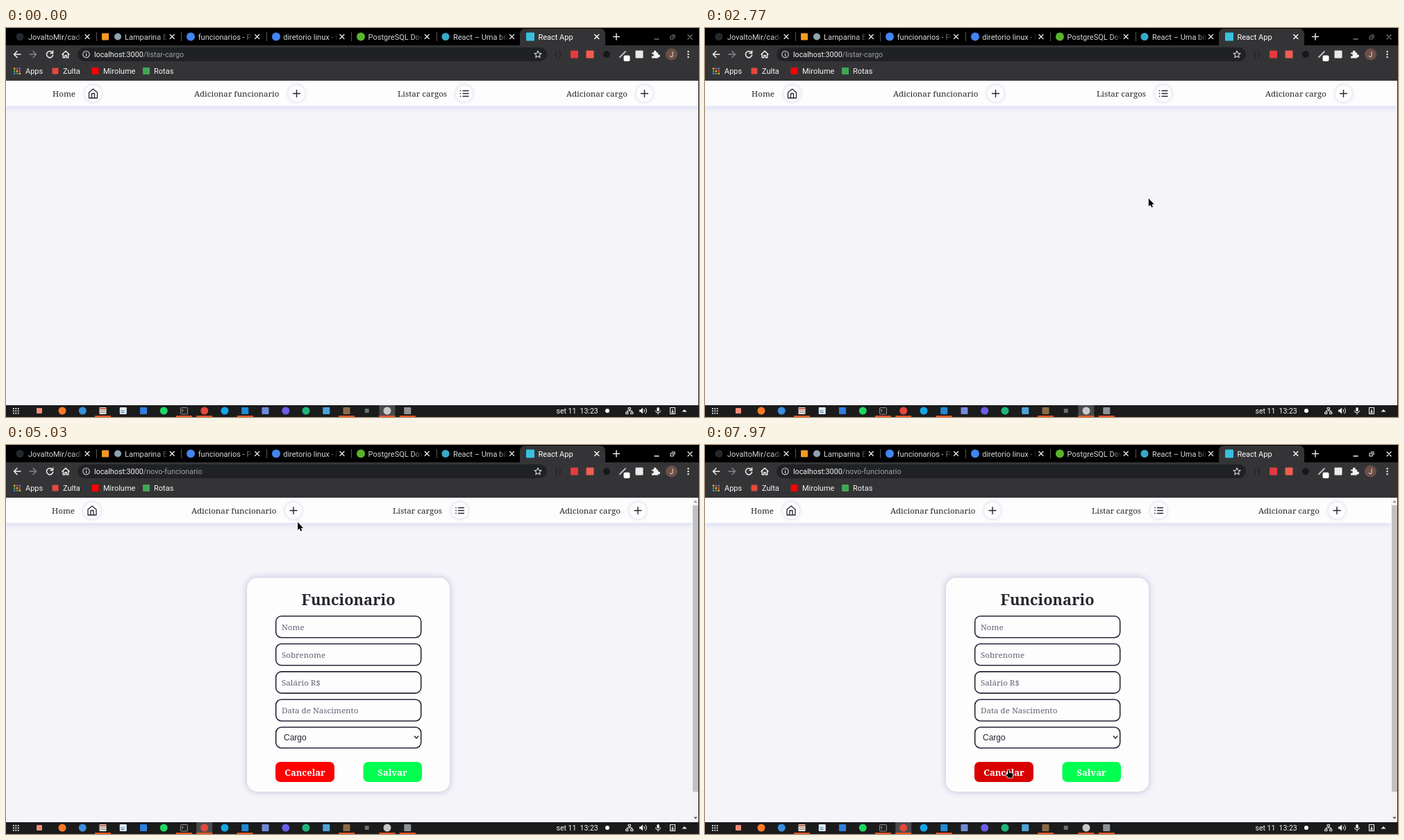
An HTML page with a canvas that plays this animation: 998 by 561 pixels, repeating every 8000 ms.

```html
<!DOCTYPE html>
<html lang="pt">
<head>
<meta charset="utf-8">
<title>React App</title>
<style>
html, body { margin: 0; width: 100%; height: 100%; overflow: hidden; background: #f4f4f9; }
canvas { display: block; }
</style>
</head>
<body>
<canvas id="stage" width="998" height="561"></canvas>
<script>
const ctx = document.getElementById('stage').getContext('2d');
const LOOP = 8000, PAGE_SWITCH = 4250, MENU_OPEN = 5600, MENU_CLOSE = 6550;
const UI = 'Roboto, sans-serif', SLAB = '"Noto Serif", serif', SANS = '"Liberation Sans", Arial, sans-serif';
const INK = '#29262f', BAR = '#343436', PAGE = '#f4f4f9', ORANGE = '#e95420';

// Cursor keys: time, x, y
const PATH = [
  [850, 920, 575], [1070, 836, 482], [1500, 790, 425], [2200, 696, 305],
  [2770, 639, 246], [3350, 520, 160], [3850, 416, 92], [4950, 416, 92],
  [5500, 486, 419], [6600, 486, 419], [7100, 568, 420], [7320, 568, 420],
  [7750, 437, 468], [8000, 437, 468]
];

function slope(i, k) {
  const a = PATH[i - 1], b = PATH[i], c = PATH[i + 1];
  if (!a || !c || a[k] === b[k] || b[k] === c[k]) return 0;
  return (c[k] - a[k]) / (c[0] - a[0]);
}

function cursorAt(t) {
  if (t < PATH[0][0]) return null;
  let i = 0;
  while (i < PATH.length - 2 && t >= PATH[i + 1][0]) i++;
  const p = PATH[i], q = PATH[i + 1], d = q[0] - p[0], u = (t - p[0]) / d;
  const hermite = k => {
    const u2 = u * u, u3 = u2 * u;
    return (2 * u3 - 3 * u2 + 1) * p[k] + (u3 - 2 * u2 + u) * d * slope(i, k)
      + (3 * u2 - 2 * u3) * q[k] + (u3 - u2) * d * slope(i + 1, k);
  };
  return { x: hermite(1), y: hermite(2) };
}

function rect(x, y, w, h, color) {
  ctx.fillStyle = color;
  ctx.fillRect(x, y, w, h);
}

function round(x, y, w, h, r, fill, stroke, width = 1) {
  ctx.beginPath();
  ctx.roundRect(x, y, w, h, r);
  if (fill) { ctx.fillStyle = fill; ctx.fill(); }
  if (stroke) { ctx.strokeStyle = stroke; ctx.lineWidth = width; ctx.stroke(); }
}

function circle(x, y, r, fill, stroke, width = 1) {
  ctx.beginPath();
  ctx.arc(x, y, r, 0, Math.PI * 2);
  if (fill) { ctx.fillStyle = fill; ctx.fill(); }
  if (stroke) { ctx.strokeStyle = stroke; ctx.lineWidth = width; ctx.stroke(); }
}

function square(x, y, s, color) {
  round(x - s / 2, y - s / 2, s, s, 1, color);
}

// Strokes an SVG path drawn around a centre point
function icon(x, y, d, color, width = 1.3, fill) {
  ctx.save();
  ctx.translate(x, y);
  const p = new Path2D(d);
  if (fill) { ctx.fillStyle = fill; ctx.fill(p); }
  if (color) {
    ctx.strokeStyle = color;
    ctx.lineWidth = width;
    ctx.lineJoin = ctx.lineCap = 'round';
    ctx.stroke(p);
  }
  ctx.restore();
}

function text(s, x, y, font, color, align = 'left') {
  ctx.font = font;
  ctx.fillStyle = color;
  ctx.textAlign = align;
  ctx.fillText(s, x, y);
}

function shadowed(color, blur, dy, draw) {
  ctx.save();
  ctx.shadowColor = color;
  ctx.shadowBlur = blur;
  ctx.shadowOffsetY = dy;
  draw();
  ctx.restore();
}

function tabTitle(s, x, end, rgb) {
  ctx.save();
  ctx.beginPath();
  ctx.rect(x, 0, end - x, 25);
  ctx.clip();
  const fade = ctx.createLinearGradient(end - 14, 0, end, 0);
  fade.addColorStop(0, `rgb(${rgb})`);
  fade.addColorStop(1, `rgba(${rgb},0)`);
  text(s, x, 16.5, '11px ' + UI, fade);
  ctx.restore();
}

const CROSS = 'M-3-3L3 3M3-3L-3 3';
const PLUS = 'M-5 0H5M0-5V5';

function drawTabs(focused) {
  rect(0, 0, 998, 25, '#000');
  round(740, 1, 123, 30, [7, 7, 0, 0], BAR);
  const titles = ['JovaltoMir/cadastro', 'Lamparina Engine', 'funcionarios - Pesquisa',
    'diretorio linux - Pesquisa', 'PostgreSQL Download', 'React – Uma biblioteca', 'React App'];
  titles.forEach((s, i) => {
    const x = 32 + i * 122.4, active = i === 6;
    const start = i === 1 ? 171 : x;
    tabTitle(s, start, x + 79, active ? '255,255,255' : '214,215,218');
    icon(117 + i * 122.3, 12.5, CROSS, active ? '#fff' : '#e2e2e4', 1.4);
    if (i < 5) rect(Math.round(130 + i * 122.4), 6, 1, 13, '#55565a');
  });
  circle(20, 12.5, 5.5, '#24292e');
  square(143, 12.5, 10, '#f59a23');
  circle(161, 12.5, 5, '#8fa3b0');
  circle(266, 12.5, 6, '#4285f4');
  circle(389, 12.5, 6, '#4285f4');
  circle(511, 12.5, 6, '#58b52c');
  circle(633, 12.5, 5.5, '#38a9c9');
  square(755, 12.5, 12, '#38c0e0');
  icon(879, 12.5, 'M-4.5 0H4.5M0-4.5V4.5', '#e8e8e8', 1.5);
  const c = focused ? '#f2f2f2' : '#77787c';
  icon(937, 13, 'M-3 3H3', c);
  icon(960, 13, 'M-3-1H1V3H-3ZM-1-3H3V1', c, 1.1);
  icon(985, 13, CROSS, c, 1.3);
}

function drawToolbar(url) {
  rect(0, 25, 998, 51, BAR);
  icon(16, 38, 'M5 0H-4.5M0-4.5L-4.5 0L0 4.5', '#f2f2f2', 1.5);
  icon(39, 38, 'M-5 0H4.5M0-4.5L4.5 0L0 4.5', '#85868a', 1.5);
  icon(63, 38, 'M3.8-2.6A4.6 4.6 0 1 0 4.6 1M4.6-5V-1.5H1', '#f2f2f2', 1.5);
  icon(86, 38, 'M-5 0L0-4.8L5 0M-3.7-1V4.7H-1.2V1.5H1.2V4.7H3.7V-1', '#f2f2f2', 1.4);
  round(103, 28, 676, 20, 10, '#202123');
  circle(115.5, 38, 4.7, null, '#d8d8da', 1.1);
  rect(115, 37, 1.2, 4, '#d8d8da');
  rect(115, 35, 1.2, 1.2, '#d8d8da');
  text('localhost:3000', 127, 41.7, '10.75px ' + UI, '#f2f2f2');
  const hostWidth = ctx.measureText('localhost:3000').width;
  text(url, 127 + hostWidth, 41.7, '10.75px ' + UI, '#a0a1a5');
  icon(766, 38, 'M0-5L1.5-1.7L5-1.4L2.4 1L3.1 4.6L0 2.7L-3.1 4.6L-2.4 1L-5-1.4L-1.5-1.7Z', '#d8d8da', 1.1);

  text('{·}', 795, 41.5, '10px ' + UI, '#1c1c1f', 'center');
  square(818.5, 38, 11, '#e33a3f');
  square(841, 38, 11, '#ef5e50');
  circle(865, 38, 5, '#17181a');
  icon(888, 38, 'M-4 4L4-4', '#b9bcc2', 2);
  round(889.5, 39.5, 9, 8.5, 2, '#fff');
  square(912, 38, 11, '#e9e9e9');
  icon(935, 38.5, 'M-5-3H-2A2 2 0 1 1 1.5-3H4V0A2 2 0 1 1 4 3.5V5H-5V2A1.8 1.8 0 1 0-5-1Z', null, 1, '#f2f2f2');
  circle(958.5, 38, 8.5, '#6d5048');
  text('J', 958.5, 41.5, '10px ' + UI, '#f0e8e4', 'center');
  for (let i = -1; i < 2; i++) circle(982.5, 38 + i * 4, 1.2, '#f2f2f2');

  const dots = ['#e5483b', '#f2b62c', '#3fa657', '#4a86e8'];
  for (let i = 0; i < 9; i++)
    rect(11 + i % 3 * 3.8, 57.5 + Math.floor(i / 3) * 3.5, 2.4, 2.4, dots[(i * 3 + 1) % 4]);
  square(71, 62, 9, '#e5483b');
  square(128.5, 62, 10, '#f00');
  square(202, 62, 10, '#3fa657');
  [['Apps', 28], ['Zulta', 82], ['Mirolume', 140], ['Rotas', 213]]
    .forEach(([s, x]) => text(s, x, 66, '11px ' + UI, '#f5f5f5'));
}

function drawNav(form, hover) {
  const width = form ? 988 : 998;
  shadowed('rgba(90,90,220,.17)', 8, 2, () => rect(0, 76, width, 36.5, '#fdfdfd'));
  const items = form
    ? [['Home', 66, 124], ['Adicionar funcionario', 267, 414], ['Listar cargos', 557, 653.5], ['Adicionar cargo', 797, 910]]
    : [['Home', 67, 125.5], ['Adicionar funcionario', 271, 418.5], ['Listar cargos', 564, 660], ['Adicionar cargo', 807, 919.5]];
  items.forEach(([label, x, cx], i) => {
    text(label, x, 99.3, '11.6px ' + SLAB, INK);
    shadowed('rgba(90,90,210,.3)', 5, 0, () => circle(cx, 94.5, 12, '#fdfdfd'));
    const color = hover && i === 1 ? '#b9b8c4' : INK;
    if (i === 0) icon(cx, 94.5, 'M-6-1.5L0-6.5L6-1.5V6.5H-6ZM-2 6.5V0H2V6.5', color);
    else if (i === 2) icon(cx, 94.5, 'M-2-4H6M-2 0H6M-2 4H6M-5.7-4H-5.3M-5.7 0H-5.3M-5.7 4H-5.3', color);
    else icon(cx, 94.5, PLUS, color, 1.4);
  });
}

function drawScrollbar() {
  rect(988, 76, 10, 468, '#f3f3f5');
  rect(989, 87, 8, 413, '#c1c1c3');
  icon(993, 81.5, 'M-2.5 1.5L0-1.5L2.5 1.5Z', null, 1, '#8a8a8e');
  icon(993, 538, 'M-2.5-1.5L0 1.5L2.5-1.5Z', null, 1, '#505054');
}

function drawForm(cancelHover, menu) {
  shadowed('rgba(60,60,150,.3)', 10, 0, () => round(347, 191.5, 292, 308.5, 15, '#fdfdfd'));
  text('Funcionario', 493, 231, '600 21.8px ' + SLAB, INK, 'center');
  ['Nome', 'Sobrenome', 'Salário R$', 'Data de Nascimento'].forEach((s, i) => {
    const y = 246 + i * 40.1;
    round(388.7, y + .7, 209, 31, 8, '#fdfdfd', '#2b2638', 1.6);
    text(s, 397, y + 20.7, '11.6px ' + SLAB, '#686378');
  });
  round(388.7, 407, 209, 30, 8, '#fdfdfd', '#2b2638', 1.6);
  text('Cargo', 400, 426, '12px ' + SANS, INK);
  icon(591, 421.5, 'M-2.7-1.4L0 1.4L2.7-1.4', INK, 1.5);

  round(388, 457, 85, 29, 7, cancelHover ? '#d90000' : '#f00');
  text('Cancelar', 430.5, 476.7, '600 13px ' + SLAB, '#fff', 'center');
  round(514.5, 457, 84.5, 29, 7, '#00ff50');
  text('Salvar', 556.5, 476.7, '600 13px ' + SLAB, '#fff', 'center');
  if (menu) {
    shadowed('rgba(0,0,0,.4)', 4, 2, () => rect(388, 438, 210.5, 16, '#3f6df2'));
    text('Cargo', 399, 449, '12px ' + SANS, '#fff');
  }
}

function drawTaskbar(active) {
  rect(0, 544, 998, 17, '#1b1b1c');
  rect(active - 11.5, 544, 23, 17, '#4a4a4c');
  for (let i = 0; i < 9; i++) rect(10 + i % 3 * 3.4, 548 + Math.floor(i / 3) * 3.4, 1.8, 1.8, '#f0f0f0');

  const apps = ['#f08a78', '#ff7a26', '#3b8fdc', '#e9e2d8', '#dfeaf2', '#2f7de0', '#1ed760', '#2a2a2c',
    '#e2473a', '#12a5e8', '#1f8ad2', '#7289da', '#6c5ce7', '#1fb57a', '#4fa3d8', '#8a6a45',
    '#6d6f73', '#c8c8c8', '#8f9194'];
  const discs = [1, 2, 6, 8, 9, 12, 13, 17];
  const running = [3, 7, 8, 10, 15, 17, 18];
  apps.forEach((color, i) => {
    const x = i ? 81 + (i - 1) * 29.25 : 48;
    if (discs.includes(i)) circle(x, 552, 5.5, color);
    else square(x, 552, i === 16 ? 6 : i === 0 ? 8 : 10, color);
    if (running.includes(i)) rect(x - 11.5, 559, 23, 2, ORANGE);
  });
  round(251.5, 547.5, 10, 9.5, 1, '#232325', '#8e8e90');
  icon(255, 551.5, 'M-1.5-1.5L0 0L-1.5 1.5', '#e8e8e8', .9);
  rect(135, 548, 9, 2, '#c95f4a');
  [551.5, 554].forEach(y => {
    rect(135.5, y, 8, 1, '#8c8680');
    rect(165.5, y, 5, 1, '#3a7fae');
  });

  text('set 11  13:23', 792.5, 556, '10.5px ' + UI, '#f5f5f5');
  circle(866, 552, 3, '#fff');
  icon(898, 552, 'M-1.5-4.5H1.5V-2H-1.5ZM-5 2H-2V4.5H-5ZM2 2H5V4.5H2ZM0-2V0M-3.5 2V0H3.5V2', '#f0f0f0', 1);
  icon(916, 552, 'M-4-1.5H-2L1-4.5V4.5L-2 1.5H-4Z', null, 1, '#f0f0f0');
  icon(919, 552, 'M0-2Q1.5 0 0 2M2-4Q5 0 2 4', '#f0f0f0', 1);
  round(937.4, 547, 3.4, 6, 1.7, '#f0f0f0');
  icon(939, 552, 'M-3.5 0Q-3.5 3 0 3Q3.5 3 3.5 0M0 3V5', '#f0f0f0', 1);
  icon(960, 552, 'M-3.5-4.5H3.5V4.5H-3.5ZM-1 1H1V3H-1ZM0 1V-2', '#f0f0f0', 1.1);
  icon(977, 552, 'M-3.5 1.5L0-2L3.5 1.5Z', null, 1, '#f0f0f0');
}

function drawStatus() {
  round(0, 527, 171, 17, [0, 3, 0, 0], '#050506');
  text('localhost:3000/novo-funcionario', 4, 539, '11.6px ' + UI, '#f5f5f5');
}

function drawCursor(p, hand) {
  const arrow = 'M0 0V11.5L2.6 9.2L4.3 13L6.2 12.2L4.5 8.5H8Z';
  const pointer = 'M-.8.8Q0-.4.9.8V4.6L5.8 5.6Q6.6 5.9 6.5 7L5.6 11.8H-.6L-3.3 8Q-3.4 6.4-1.8 6.8L-.8 7.6Z';
  const shape = hand ? pointer : arrow;
  icon(p.x, p.y, shape, '#fff', 1.6);
  icon(p.x, p.y, shape, null, 1, '#000');
}

const inside = (p, x, y, w, h) => p && p.x >= x && p.x <= x + w && p.y >= y && p.y <= y + h;

function draw(t) {
  const form = t >= PAGE_SWITCH;
  const p = cursorAt(t);
  const link = inside(p, form ? 267 : 271, 81, 161, 27);
  const cancel = form && inside(p, 388, 457, 85, 29);

  rect(0, 0, 998, 561, PAGE);
  drawNav(form, link);
  if (form) {
    drawForm(cancel, t >= MENU_OPEN && t < MENU_CLOSE);
    drawScrollbar();
  }
  rect(997, 76, 1, 468, '#1b1b1c');
  drawTabs(form);
  drawToolbar(form ? '/novo-funcionario' : '/listar-cargo');
  if (link) drawStatus();
  drawTaskbar(form ? 285.8 : 548.9);
  if (p) drawCursor(p, link || cancel);
}

function tick() {
  draw(performance.now() % LOOP);
  requestAnimationFrame(tick);
}
tick();
</script>
</body>
</html>
```
